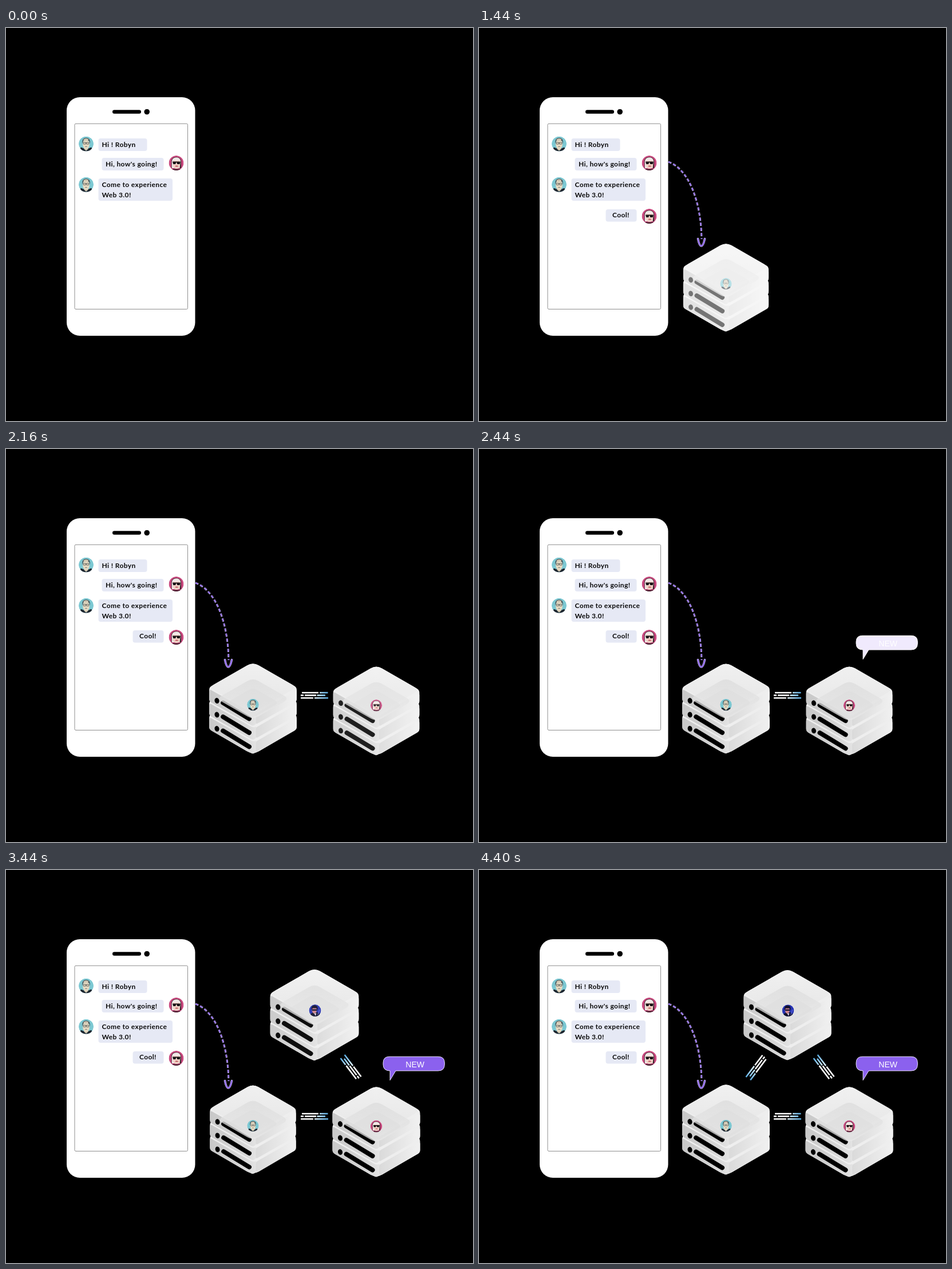
These frames come from a looping animation (816 px wide and 687 px high, 5 s). An HTML page:

```html
<!DOCTYPE html>
<html lang="en">
<head>
<meta charset="utf-8">
<title>Chat to servers</title>
<style>
  html, body { margin: 0; width: 100%; height: 100%; overflow: hidden; background: #000; }
  svg { display: block; width: 816px; height: 687px; }
  .chat { font: 700 12px Lato, "Open Sans", sans-serif; letter-spacing: .38px; fill: #0a0a0a; }
  .tag { font: 14px "Liberation Sans", Arial, sans-serif; fill: #fff; }
  .msg { fill: #e6e9f5; }
</style>
</head>
<body>
<svg viewBox="0 0 816 687" xmlns="http://www.w3.org/2000/svg">
  <defs>
    <linearGradient id="top" x1="0" y1="0" x2="0" y2="1">
      <stop offset="0" stop-color="#f0f0f0"/><stop offset="1" stop-color="#e6e6e6"/>
    </linearGradient>
    <linearGradient id="left" x1="0" y1="0" x2="1" y2="0">
      <stop offset="0" stop-color="#c8c8c8"/><stop offset=".75" stop-color="#d8d8d8"/><stop offset="1" stop-color="#e4e4e4"/>
    </linearGradient>
    <linearGradient id="right" x1="0" y1="0" x2="1" y2="0">
      <stop offset="0" stop-color="#dadada"/><stop offset="1" stop-color="#f1f1f1"/>
    </linearGradient>
    <linearGradient id="glass" x1="0" y1="0" x2="0" y2="1">
      <stop offset="0" stop-color="#dcdcdc"/><stop offset="1" stop-color="#e8e8e8"/>
    </linearGradient>
    <linearGradient id="blue" gradientUnits="userSpaceOnUse" x1="3" y1="0" x2="24" y2="0">
      <stop offset="0" stop-color="#d9f0ff"/><stop offset="1" stop-color="#55a9e0"/>
    </linearGradient>
    <clipPath id="round"><circle r="13"/></clipPath>
    <clipPath id="hex"><path class="hull"/></clipPath>

    <g id="teal" clip-path="url(#round)">
      <circle r="13" fill="#7cc8d2"/>
      <path d="M-13 13L-9 6L-4 8L0 12L4 8L9 6L13 13Z" fill="#1d2630"/>
      <path d="M-3.500 5H3.500V9L0 12L-3.500 9Z" fill="#d6c8ae"/>
      <ellipse cy=".5" rx="5.900" ry="8.600" fill="#e6dac2"/>
      <path d="M-6.600 0Q-8-10.500 0-10.500Q8-10.500 6.600 0L5.400-5Q1-7.500-5-5.500Z" fill="#3b454a"/>
      <path d="M-4.500-8Q0-11 4.500-8L3-5.500Q-1-7-4.500-5Z" fill="#cfc6b2"/>
      <path d="M-5-2.500H-.8V.5H-4.600ZM5-2.500H.8V.5H4.600ZM-.8-2H.8M-1.600 4.800H1.600" fill="none" stroke="#4a4f50" stroke-width=".8"/>
    </g>
    <g id="pink" clip-path="url(#round)">
      <circle r="13" fill="#c9497f"/>
      <path d="M-8.600 9V-3Q-8-10.500 0-10.500Q8-10.500 8.600-3V9Z" fill="#3a2029"/>
      <path d="M-7.800 9V-3Q-7-9.700 0-9.700Q6.500-9.700 7.600-4L6 9Z" fill="#f2e9e8"/>
      <path d="M-5.500-4H6.500V5Q5 10 .5 10Q-4.500 10-5.500 5Z" fill="#efd0c5"/>
      <path d="M-6.500-2.500H7V-1L6 2H1.700L.7-1H-.3L-1.300 2H-5.300Z" fill="#151014"/>
      <path d="M-1.500 5.500H3" stroke="#b9434f" stroke-width="1.300"/>
      <path d="M-9 13Q-6 9-3 10.500H4Q7 9 9 13Z" fill="#4a2030"/>
    </g>
    <g id="navy" clip-path="url(#round)">
      <circle r="13" fill="#2634b4"/>
      <path d="M-12 13Q-9 4-2 4H5Q11 5 12 13Z" fill="#11132c"/>
      <ellipse cx="-1.500" cy="-.5" rx="5" ry="7" fill="#c98088"/>
      <path d="M-8-1Q-9-10.500-1-11.500Q7-11 6-1L3-5H-5Z" fill="#14122e"/>
      <path d="M-7-2.500H4.500V.5H-6Z" fill="#161430"/>
      <path d="M-2 6L1 12L3 6Z" fill="#d8cbe6"/>
      <path d="M6 9L10-2" stroke="#5a62d8" stroke-width="1.800"/>
    </g>

    <g id="slab">
      <path class="hull" fill="#eee"/>
      <path id="wallL" fill="url(#left)"/>
      <path id="wallR" fill="url(#right)"/>
      <path id="lid" fill="url(#top)"/>
      <ellipse cx="-63" cy="-13.500" rx="4" ry="5" transform="rotate(-14 -63 -13.500)"/>
      <path d="M-52.300-9.800L-6.500 18" stroke="#000" stroke-width="8" stroke-linecap="round"/>
    </g>
    <g id="rack">
      <use href="#slab" y="49"/>
      <use href="#slab" y="24.500"/>
      <use href="#slab"/>
      <g clip-path="url(#hex)">
        <path id="floor" fill="url(#glass)" opacity=".75"/>
        <path id="floor2" fill="#d9d9d9" opacity=".4"/>
      </g>
    </g>
    <g id="link" stroke-width="2.600">
      <path d="M-22-4.500H7M-24 .1H-19M-17 .1H3M-24 4.700H-2" stroke="#fff"/>
      <path d="M9-4.500H23.500M4.500 .1H19M0 4.700H24" stroke="url(#blue)"/>
    </g>
    <path id="curve" d="M331 234C367 247 388 304 389 369"/>
    <path id="tip" d="M382.500 368.500Q385 381 388.300 381Q392 381 394.500 368.500" stroke-linecap="round"/>
  </defs>

  <rect width="816" height="687"/>
  <rect x="106" y="121" width="224.500" height="417" rx="23" fill="#fff"/>
  <rect x="186" y="143.200" width="50" height="6.600" rx="3.300"/>
  <circle cx="246.200" cy="146.500" r="4.800"/>
  <rect x="120" y="167.300" width="197.500" height="324.200" rx="2" fill="none" stroke="#8f8f8f"/>

  <rect class="msg" x="161.500" y="193" width="85" height="22" rx="4"/>
  <rect class="msg" x="167.500" y="227" width="108" height="22" rx="4"/>
  <rect class="msg" x="161.500" y="263" width="129.500" height="39" rx="4"/>
  <g class="chat">
    <text x="167.500" y="208">Hi ! Robyn</text>
    <text x="174" y="242">Hi, how's going!</text>
    <text x="167.500" y="278">Come to experience</text>
    <text x="167.500" y="296">Web 3.0!</text>
  </g>
  <use href="#teal" x="140" y="202.500"/>
  <use href="#pink" x="297.500" y="236"/>
  <use href="#teal" x="140" y="273.800"/>

  <use id="face" href="#pink" x="297.500" y="329"/>
  <rect id="reply" class="msg" x="221.500" y="317" width="54" height="21.500" rx="4"/>
  <text id="cool" class="chat" x="233" y="331">Cool!</text>

  <g id="arrow" fill="none">
    <g stroke="#e4dbff">
      <use href="#curve" stroke-width="2.900" stroke-dasharray="5.500 3.500"/>
      <use href="#tip" stroke-width="3.600"/>
    </g>
    <g stroke="#875fe6">
      <use href="#curve" stroke-width="2" stroke-dasharray="5 4"/>
      <use href="#tip" stroke-width="2.300"/>
    </g>
  </g>

  <g id="rack1"><use href="#rack"/><use href="#teal" transform="translate(0 -6.500) scale(.8)"/></g>
  <g id="rack2"><use href="#rack"/><use href="#pink" transform="translate(0 -9.500) scale(.8)"/></g>
  <g id="rack3"><use href="#rack"/><use href="#navy" transform="translate(1 -7.500) scale(.8)"/></g>
  <use id="link1" href="#link" transform="translate(539 430.500)"/>
  <use id="link2" href="#link" transform="translate(602.300 345) rotate(233)"/>
  <use id="link3" href="#link" transform="translate(484.700 345.700) rotate(127)"/>

  <g id="tag">
    <path d="M670 326.300H755Q766.300 326.300 766.300 337V340Q766.300 351 755 351H681L671 367.500V351Q659 351 659 340V337Q659 326.300 670 326.300Z" fill="#8b61ee" stroke="#e9e1ff"/>
    <text class="tag" x="698.300" y="344.500">NEW</text>
  </g>
</svg>
<script>
const LOOP = 5000, STEP = 40;
const $ = id => document.getElementById(id);
const clamp = v => Math.max(0, Math.min(1, v));

// Closed polygon with rounded corners; a point may carry its own radius
function rounded(pts, radius) {
  const toward = (a, b, r) => {
    const k = r / Math.hypot(b[0] - a[0], b[1] - a[1]);
    return [a[0] + (b[0] - a[0]) * k, a[1] + (b[1] - a[1]) * k];
  };
  return pts.map((p, i) => {
    const r = p[2] ?? radius;
    const before = pts[(i + pts.length - 1) % pts.length];
    const after = pts[(i + 1) % pts.length];
    return `${i ? "L" : "M"}${toward(p, before, r)}Q${p[0]},${p[1]} ${toward(p, after, r)}`;
  }).join("") + "Z";
}

const W = 76.5, H = 44;
const diamond = (y, k = 1) => [[0, y - H * k], [W * k, y], [0, y + H * k], [-W * k, y]];
const hull = rounded([[0, -81, 12], [W, -37], [W, -12.5], [0, 32, 12], [-W, -12.5], [-W, -37]], 5);
document.querySelectorAll(".hull").forEach(p => p.setAttribute("d", hull));
$("wallL").setAttribute("d", rounded([[-W, -34], [0, 9], [7, 7], [7, 26], [0, 31], [-W, -12.5]], 4));
$("wallR").setAttribute("d", rounded([[5, 9], [W, -32], [W, -12.5], [5, 28]], 4));
$("lid").setAttribute("d", rounded(diamond(-37), 11));
$("floor").setAttribute("d", rounded(diamond(-17, .83), 11));
$("floor2").setAttribute("d", rounded(diamond(-10, .6), 9));

// Linear interpolation through [time, value] pairs
function along(table, t) {
  if (t <= table[0][0]) return table[0][1];
  for (let i = 1; i < table.length; i++) {
    const [t0, v0] = table[i - 1], [t1, v1] = table[i];
    if (t <= t1) return v0 + (v1 - v0) * (t - t0) / (t1 - t0);
  }
  return table[table.length - 1][1];
}

const bounce = [[0, .3], [.2, 1.1], [.4, .9], [.6, 1.033], [.8, .97], [1, 1]];
const breath = [[2120, 1], [2440, .998], [3120, .987], [3880, .976], [4120, 1.035], [4400, 1]];

const racks = [
  { el: $("rack1"), x: 431.5, y: 453.5, start: 1115, span: 1000, after: breath },
  { el: $("rack2"), x: 647, y: 457.5, start: 1765, span: 750 },
  { el: $("rack3"), x: 539, y: 253.2, start: 3015, span: 750 }
];
const pops = [["reply", 520], ["link1", 1880], ["link2", 3120], ["link3", 3680]];

const show = (el, on) => { el.style.display = on ? "" : "none"; };

// Fade in from white instead of from the black stage
function whiten(el, a) {
  el.style.filter = a < 1 ? `invert(1) brightness(${a}) invert(1)` : "none";
}

function draw(t) {
  $("face").style.opacity = clamp(t / 320);
  $("cool").style.opacity = clamp((t - 640) / 120);
  for (const [id, at] of pops) show($(id), t >= at);

  show($("arrow"), t >= 1000);
  whiten($("arrow"), clamp(.5 + (t - 1000) / 320));

  show($("tag"), t >= 2440);
  whiten($("tag"), clamp((t - 2400) / 300));

  for (const r of racks) {
    const p = (t - r.start) / r.span;
    const alpha = clamp(p / .6);
    const size = along(bounce, p) * (r.after ? along(r.after, t) : 1);
    show(r.el, alpha >= .5);
    whiten(r.el, alpha);
    r.el.setAttribute("transform", `translate(${r.x} ${r.y}) scale(${size})`);
  }
}

const begin = performance.now();
function tick() {
  const t = (performance.now() - begin) % LOOP;
  draw(Math.floor(t / STEP) * STEP);
  requestAnimationFrame(tick);
}
draw(0);
requestAnimationFrame(tick);
</script>
</body>
</html>
```
